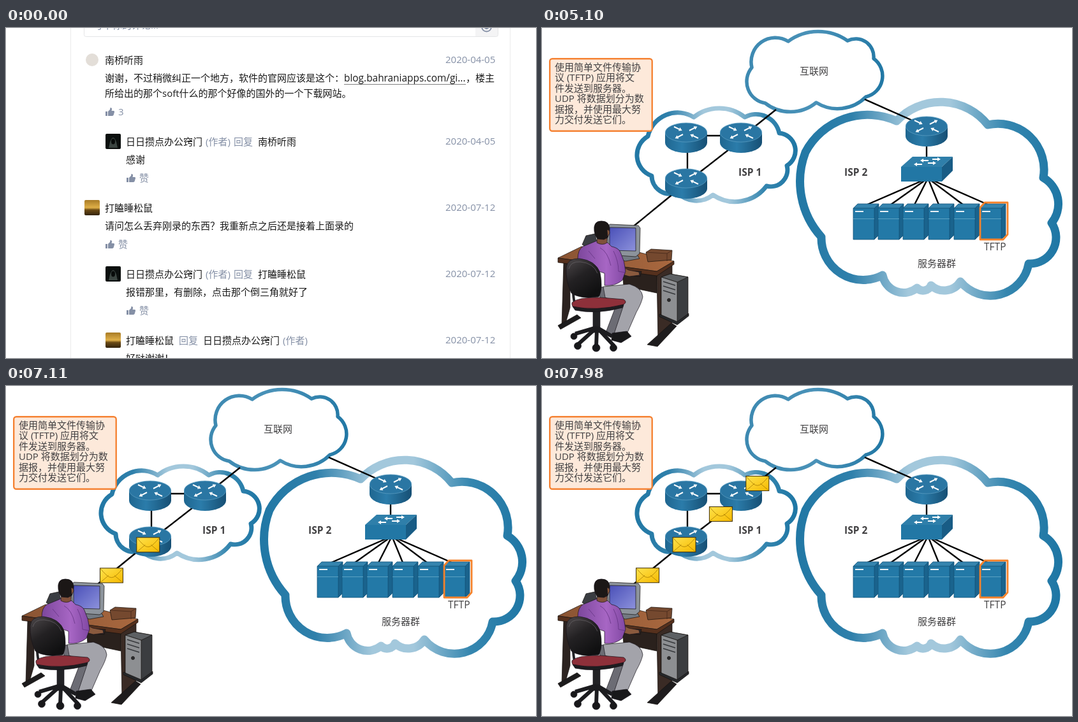
An HTML page for the animation above (8000 ms loop, 831x518 px).

```html
<!DOCTYPE html>
<html lang="zh">
<head>
<meta charset="utf-8">
<style>
html, body { margin: 0; width: 100%; height: 100%; overflow: hidden; background: #fff; }
svg { display: block; width: 831px; height: 518px; }
text { font: 15px "Open Sans", "Noto Sans CJK SC", "Noto Sans CJK", sans-serif; fill: #1a1a1a; white-space: pre; }
.dim { fill: #8590a6; }
.label { fill: #414042; }
.bold { font-weight: 700; font-size: 15.5px; }
</style>
</head>
<body>
<svg viewBox="0 0 831 518">
  <defs>
    <linearGradient id="rim"><stop stop-color="#2278a5"/><stop offset=".2" stop-color="#2f80ab"/><stop offset=".42" stop-color="#a3c8dc"/><stop offset=".58" stop-color="#a3c8dc"/><stop offset=".8" stop-color="#3586af"/><stop offset="1" stop-color="#1f77a5"/></linearGradient>
    <linearGradient id="rim2"><stop stop-color="#3d89b1"/><stop offset=".5" stop-color="#4a92b8"/><stop offset="1" stop-color="#2278a5"/></linearGradient>
    <linearGradient id="drum"><stop stop-color="#1f6690"/><stop offset=".4" stop-color="#2b7caa"/><stop offset="1" stop-color="#164f74"/></linearGradient>
    <linearGradient id="beam"><stop stop-color="#9bd8f7"/><stop offset="1" stop-color="#35aee9"/></linearGradient>
    <linearGradient id="gold" x2="1" y2="1"><stop stop-color="#ffe34d"/><stop offset="1" stop-color="#f6b900"/></linearGradient>
    <linearGradient id="screen" x2="1" y2="1"><stop stop-color="#4a50b8"/><stop offset="1" stop-color="#8d92dc"/></linearGradient>
    <linearGradient id="shirt"><stop stop-color="#7c479c"/><stop offset=".6" stop-color="#a766c4"/><stop offset="1" stop-color="#8148a3"/></linearGradient>
    <linearGradient id="wood"><stop stop-color="#8a5433"/><stop offset="1" stop-color="#a9683f"/></linearGradient>
    <linearGradient id="leather" x2=".6" y2="1"><stop stop-color="#4d484a"/><stop offset=".5" stop-color="#232123"/><stop offset="1" stop-color="#101011"/></linearGradient>
    <linearGradient id="dusk" x2="0" y2="1"><stop stop-color="#a87b26"/><stop offset=".5" stop-color="#e0b048"/><stop offset=".65" stop-color="#6b4a14"/><stop offset="1" stop-color="#33230c"/></linearGradient>
    <g id="mail">
      <rect x=".5" y=".5" width="36" height="23" fill="url(#gold)" stroke="#3b2c08"/>
      <path d="M1 23L14 12M36 23L23 12M1 1Q10 12 15 14.500Q18.500 16 22 14.500Q27 12 36 1" fill="none" stroke="#a87c00" stroke-width=".8"/>
    </g>
  </defs>
  <g id="page"></g>
  <g id="scene">
    <g id="network"></g>
    <g id="desk" stroke="#15100e" stroke-width=".7" stroke-linejoin="round">
      <path d="M63 340l6-14 14-3 5 20-10 6z" fill="#3a3d42"/>
      <path d="M34 367h10v72l-8 28h-5z" fill="#2c2320"/>
      <path d="M25 467l30-17 6 5-32 18z" fill="#1c1b1c"/>
      <path d="M126 384l54-2v34l-52-11z" fill="#2a211d"/>
      <path d="M180 386l24-16v92l-22 32z" fill="#3a2b25"/>
      <path d="M165 497l38-34 8 5-30 32z" fill="#1e1c1d"/>
      <path d="M25 361l37-18 90 9 55 14-27 16z" fill="url(#wood)"/>
      <path d="M25 361l155 21 27-16v5l-27 18-155-21z" fill="#55301d"/>
      <path d="M163 352l8-5 33 2-1 15-37 3z" fill="#75492f"/>
      <path d="M163 352l33 2 8-5M196 354v12" fill="none" stroke="#3f2517"/>
      <path d="M187 391l14-5 28 5v59l-17 13-25-11z" fill="#3b3d40"/>
      <path d="M187 391l14-5 28 5-17 8z" fill="#5d6063"/>
      <path d="M187 391l25 8v64l-25-11z" fill="#8d8f92"/>
      <path d="M190 398l19 6M190 405l19 6M190 412l19 6" fill="none" stroke="#37393c" stroke-width="1.500"/>
      <circle cx="199" cy="427" r="2.500" fill="#2c2d30"/>
      <path d="M184 449l28 12 18-13v4l-18 14-28-13z" fill="#26282b"/>
      <path d="M118 354h30l5 8-22 4-20-5z" fill="#737a82"/>
      <path d="M101 311l6-3 44 2 3 4-1 40-6 5-42-3z" fill="#8c939b"/>
      <path d="M106 313l41 1v36l-41-1z" fill="url(#screen)"/>
      <path d="M121 381l35 1-2 8-33-3z" fill="#2b2424"/>
    </g>
    <g id="worker" stroke="#17131a" stroke-width=".7" stroke-linejoin="round">
      <path d="M90 407l36-2 18 8-2 30-22 38-16 3-4-6 16-42-25-10z" fill="#6c6c74"/>
      <path d="M96 406l41-4q20 6 21 20-2 10-10 24l-14 32-21 2 15-45-29-12z" fill="#a3a3aa"/>
      <path d="M110 479l23-3 7 8-16 10-15-4z" fill="#18181a"/>
      <path d="M80 438h11v40h-11z" fill="#222225"/>
      <path d="M86 470L52 480M86 470l-30 27M86 473l-1 27M86 470l27 29M86 470l24 14" stroke="#1c1c1f" stroke-width="6" fill="none"/>
      <g fill="#18181a"><circle cx="50" cy="484" r="5"/><circle cx="56" cy="499" r="5.500"/><circle cx="85" cy="502" r="6"/><circle cx="112" cy="502" r="5.500"/></g>
      <path d="M49 412q0 24 8 27l28 3" fill="none" stroke="#222226" stroke-width="4"/>
      <path d="M47 431q10-9 45-8l36 3q8 5-4 10-36 10-72 5-6-4-5-10z" fill="#8e303a"/>
      <path d="M48 437q36 8 80-3l-2 5q-40 11-74 4z" fill="#1d1d20"/>
      <path d="M124 374l12 6 16 3 1 5-16 2-15-4z" fill="#8a5a3e"/>
      <path d="M86 334l-22 9q-8 5-8 20l2 8 40 14v19q16 2 28-8l5-14q-1-16-8-30-3-7-14-9l-6-6z" fill="url(#shirt)"/>
      <path d="M112 350q8 16 8 32l11 2M91 345q12 6 17 28M73 350l10 12" fill="none" stroke="#5f2f7d"/>
      <path d="M87 326h15v11q-7 5-16 0z" fill="#80513a"/>
      <path d="M82 319q-2-16 11-16 13 0 13 13l-3 13-6 3-10-1q-4-5-5-12z" fill="#1b1716"/>
      <path d="M102 317q4-1 4 5l-3 6z" fill="#8a5a3e"/>
      <path d="M38 376q2-15 21-14 25 3 32 22 5 26-2 38-30 4-43-6-9-18-8-40z" fill="url(#leather)"/>
      <path d="M42 378q3-12 18-11 21 2 27 18" fill="none" stroke="#6b666a"/>
    </g>
    <g id="paper">
      <path d="M153 324L237 291V367Z" fill="url(#beam)"/>
      <path d="M237 288.500h41l19 22V370H237Z" fill="#fff" stroke="#c9c9c9"/>
      <path id="scrawl" fill="none" stroke="#222" stroke-width="1.300"/>
      <path d="M274 288q10 2 11 13l14 12q-2-14-11-21-6-4-14-4z" fill="#d2d4d6" stroke="#777" stroke-width=".7"/>
    </g>
    <g id="note">
      <rect x="12.200" y="48.200" width="160.500" height="113.500" rx="4" fill="#fde9da" stroke="#f58233" stroke-width="2.400"/>
    </g>
    <g id="mails"></g>
  </g>
</svg>
<script>
const $ = id => document.getElementById(id);
const add = (id, markup) => $(id).insertAdjacentHTML("beforeend", markup);
const text = (x, y, s, cls = "") => `<text x="${x}" y="${y}" class="${cls}">${s}</text>`;
const line = (x1, y1, x2, y2) => `<path d="M${x1} ${y1}L${x2} ${y2}" stroke="#000" stroke-width="2.400"/>`;

// Comment page
const reader = "南桥听雨", author = "日日攒点办公窍门", asker = "打瞌睡松鼠";
const like = (x, y, s) => `<path transform="translate(${x} ${y - 12})" fill="#8590a6"
  d="M0 6h3v7h-3zM4 6l3-3 .500-3q3 0 2.500 3l-.5 2h3q2 0 1.500 2l-1.500 5-1.500 1H4z"/>` + text(x + 20, y, s, "dim");
const hood = `<rect width="24" height="24" rx="2" fill="#0b0f0e"/><path d="M5 22l2-9q5-14 10 0l2 9z" fill="#3b4541"/><ellipse cx="12" cy="12" rx="3" ry="4.500" fill="#080b0a"/>`;
const dusk = `<rect width="24" height="24" rx="2" fill="url(#dusk)"/>`;
const pale = `<circle cx="12" cy="12" r="10" fill="#e3ded8"/>`;

function comment(x, y, avatar, head, body, date, vote) {
  add("page", `<g transform="translate(${x} ${y})">${avatar}</g>` + text(x + 32, y + 18, head)
    + text(x + 32, y + 46, body) + text(689, y + 17, date, "dim") + (vote ? like(x + 33, y + 75, vote) : ""));
}
const dim = (x, s) => `<tspan x="${x}" class="dim">${s}</tspan>`;
const name = (x, s) => `<tspan x="${x}">${s}</tspan>`;
const answer = to => author + dim(313, "(作者)") + dim(357, "回复") + name(395, to);

add("page", `<path d="M101.500 0V518M790.500 0V518" stroke="#ebebeb"/>
  <rect x="736" y="-10" width="35" height="23" fill="#f4f4f5"/>
  <rect x="122.500" y="-30" width="649" height="43.500" rx="3" fill="none" stroke="#e4e5e7"/>
  <circle cx="753.500" cy="-2" r="7.500" fill="none" stroke="#8590a6" stroke-width="1.800"/>
  <path d="M749 -1q4.500 6 9 0z" fill="#8590a6"/>` + text(137, 1, "写下你的评论...", "dim"));
comment(123, 38, pale, reader, "谢谢，不过稍微纠正一个地方，软件的官网应该是这个：", "2020-04-05");
add("page", `<text x="530" y="84" style="font-size:15.400px">blog.bahraniapps.com/gi...</text>
  <path d="M530 88.500H721" stroke="#808080"/>` + text(721, 84, "，楼主")
  + text(155, 108, "所给出的那个soft什么的那个好像的国外的一个下载网站。") + like(156, 137, "3"));
comment(156, 166, hood, answer(reader), "感谢", "2020-04-05", "赞");
comment(123, 270, dusk, asker, "请问怎么丢弃刚录的东西？我重新点之后还是接着上面录的", "2020-07-12", "赞");
comment(156, 374, hood, answer(asker), "报错那里，有删除，点击那个倒三角就好了", "2020-07-12", "赞");
comment(156, 478, dusk, asker + dim(271, "回复") + name(309, author) + dim(434, "(作者)"), "好哒谢谢！", "2020-07-12");

// Network: each cloud is a ring of arcs, [x, y, radius / chord]
function cloud(points, width, paint) {
  let [px, py] = points[points.length - 1], d = `M${px} ${py}`;
  for (const [x, y, k] of points) {
    const r = k * Math.hypot(x - px, y - py);
    d += `A${r} ${r} 0 0 1 ${x} ${y}`;
    px = x; py = y;
  }
  return `<path d="${d}Z" fill="#fff" stroke="url(#${paint})" stroke-width="${width}" stroke-linejoin="round"/>`;
}
const arrow = (x, y, turn, len = 9) => `<path transform="translate(${x} ${y}) rotate(${turn})"
  d="M0 -1h${len}v-2l5 3l-5 3v-2h-${len}z" fill="#fff"/>`;
const router = (x, y) => `<g transform="translate(${x} ${y})">
  <path d="M-33 0V16A33 16 0 0 0 33 16V0Z" fill="url(#drum)"/>
  <ellipse rx="32.700" ry="15" fill="#2a76a3" stroke="#5b9dc2" stroke-width=".8"/>
  ${arrow(5, -3, -27)}${arrow(-5, 3, 153)}${arrow(-19, -9, 25)}${arrow(19, 9, 205)}</g>`;
const server = x => `<g transform="translate(${x} 275)" stroke="#15567c" stroke-width=".8">
  <path d="M0 8l7-7h33l-7 7z" fill="#3584ae"/><path d="M33 8l7-7v49l-7 7z" fill="#1a638d"/>
  <path d="M0 8h33v49h-33z" fill="#2379a7"/><path d="M0 24.500h33" stroke="#6aaccb"/>
  <path d="M3 13h13" stroke="#fff" stroke-width="1.800"/></g>`;
const racks = [488, 527, 566, 606, 646, 687];

add("network",
  cloud([[386, 21, .54], [479, 20, .86], [520, 48, .57], [508, 108, .55], [430, 117, .8], [350, 118, .8],
    [329, 62, .575]], 5.5, "rim2")
  + cloud([[238, 140, .616], [318, 140, .8], [372, 165, .625], [384, 216, .525], [352, 248, .58],
    [268, 262, .725], [212, 258, .73], [172, 232, .6], [166, 170, .55]], 7, "rim")
  + cloud([[556, 146, .73], [699, 152, .66], [786, 235, .6], [799, 306, .66], [763, 370, .56], [656, 398, .55],
    [610, 404, .65], [588, 408, .6], [534, 388, .58], [438, 328, .58], [413, 195, .96]], 13, "rim")
  + line(367, 128, 312, 172) + line(506, 112, 603, 155) + line(226, 169, 312, 169) + line(228, 180, 228, 235)
  + line(312, 176, 226, 243) + line(206, 260, 140, 314) + line(603, 175, 603, 210)
  + racks.map((x, i) => line(605 + (i - 2.5) * 2, 238, x + 20 - i * 1.2, 278)).join("")
  + router(226, 164) + router(312, 164) + router(226, 236) + router(603, 154)
  + `<path d="M563 218l18-16h63l-17 16z" fill="#2f7faa"/><path d="M563 218h64v23h-64z" fill="#2277a5"/>
     <path d="M627 218l17-16v22l-17 17z" fill="#185c85"/>`
  + arrow(612, 206, 0, 8) + arrow(606, 208, 180, 8) + arrow(605, 212, 0, 8) + arrow(596, 214, 180, 8)
  + racks.map(server).join("")
  + `<path d="M687 282l7-8h36v50l-7 8h-36z" fill="none" stroke="#f5822a" stroke-width="2.800" stroke-linejoin="round"/>`
  + text(404, 73, "互联网", "label") + text(308, 232, "ISP 1", "label bold") + text(474, 232, "ISP 2", "label bold")
  + `<text x="693" y="349" class="label" style="font-size:15.500px">TFTP</text>` + text(589, 375, "服务器群", "label"));

["使用简单文件传输协", "议 (TFTP) 应用将文", "件发送到服务器。", "UDP 将数据划分为数", "据报，并使用最大努", "力交付发送它们。"]
  .forEach((s, i) => add("note", text(20, 66.5 + i * 16.5, s, "label")));

let scrawl = "";
for (let row = 0; row < 13; row++) {
  scrawl += `M242 ${297 + row * 5.4}`;
  for (let x = 242; x < (row < 3 ? 275 : 289); x += 4) scrawl += "q1-1.500 2 0t2 0";
}
$("scrawl").setAttribute("d", scrawl);

// Mails leave the screen at equal gaps along one line
const gap = 57.4, startX = 108;
const path = [[6360, 108], [7110, 204.3], [7140, 209.5], [7170, 209.5], [7560, 262], [7980, 319.3], [8000, 322]];
add("mails", '<use href="#mail"/>'.repeat(4));
const mails = [...$("mails").children];

function leadX(t) {
  const i = path.findIndex(([end]) => t < end);
  if (i < 1) return -1;
  const [t0, x0] = path[i - 1], [t1, x1] = path[i];
  return x0 + (x1 - x0) * (t - t0) / (t1 - t0);
}
const show = (el, on) => el.style.display = on ? "" : "none";

function draw(now) {
  const t = Math.floor(now % 8000 / 30) * 30;
  show($("page"), t < 30);
  show($("scene"), t >= 30);
  show($("paper"), t >= 960 && t < 5100);
  show($("note"), t >= 1770);
  const lead = leadX(t);
  mails.forEach((mail, i) => {
    const x = lead - i * gap;
    show(mail, x >= startX);
    mail.setAttribute("transform", `translate(${x} ${318 - (x - startX) * .838})`);
  });
  requestAnimationFrame(() => draw(performance.now()));
}
draw(0);
</script>
</body>
</html>
```
